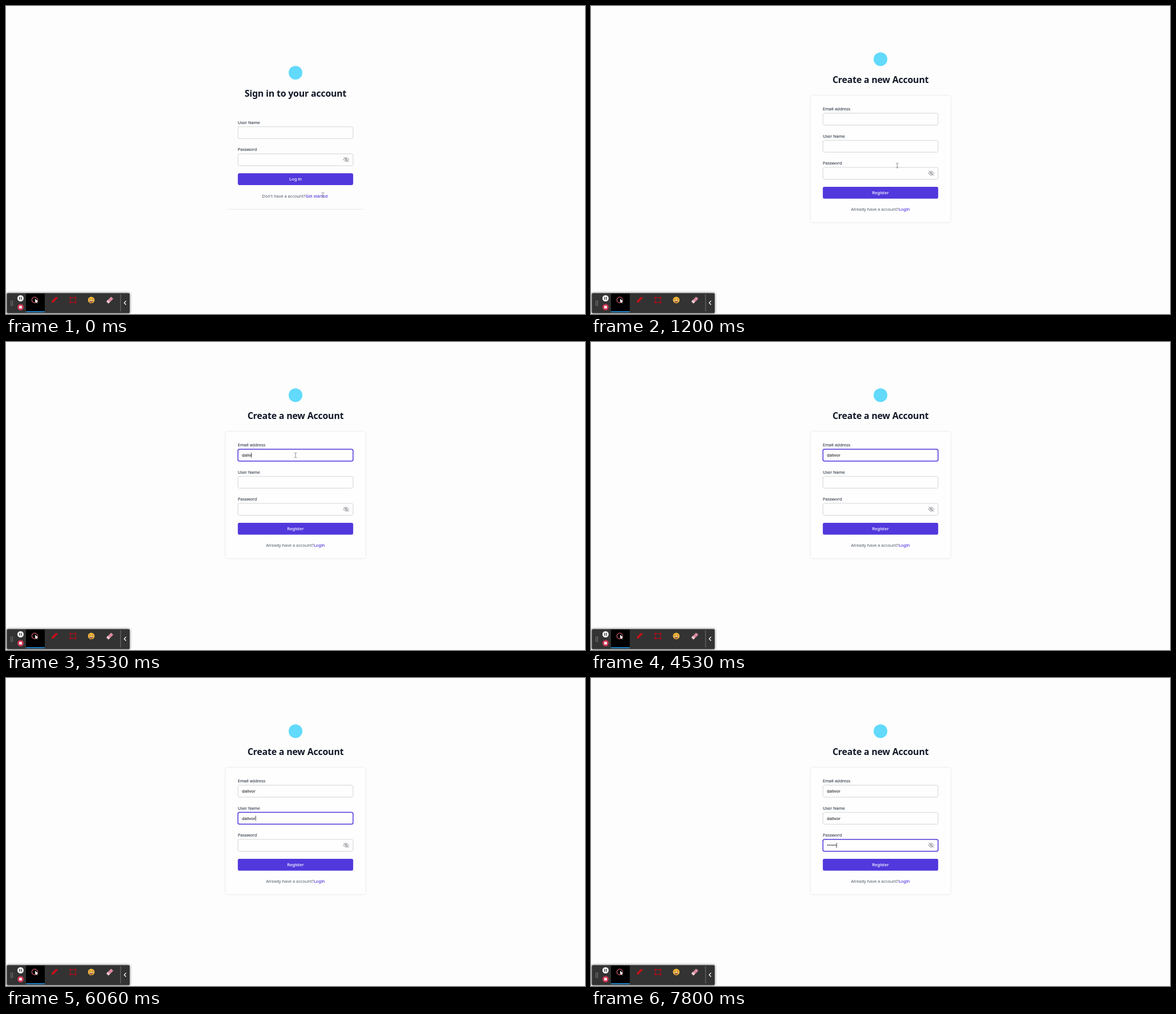
These frames come from a looping animation (1016 px wide and 540 px high, 8 s). An HTML page:

```html
<!DOCTYPE html>
<html lang="en">
<head>
<meta charset="utf-8">
<title>Account form</title>
<style>
  html, body { margin: 0; width: 100%; height: 100%; overflow: hidden; background: #fdfdfd; }
  svg { display: block; width: 100%; height: 100%; }
  text { font: 400 7.4px 'Noto Sans', 'Open Sans', sans-serif; fill: #4b5563; white-space: pre; }
  .title { font-size: 15.9px; font-weight: 700; letter-spacing: -.18px; fill: #111827; text-anchor: middle; }
  .label { font-weight: 500; fill: #374151; stroke: #374151; stroke-width: .14px; }
  .typed { fill: #18181b; stroke: #18181b; stroke-width: .06px; }
  .link { font-weight: 500; fill: #5138dc; stroke: #5138dc; stroke-width: .14px; }
  .end { text-anchor: end; }
  .action { font-size: 7.6px; font-weight: 500; fill: #fff; stroke: #fff; stroke-width: .14px; text-anchor: middle; }
  .tool { font: 500 5.6px Roboto, sans-serif; fill: #fff; stroke: #fff; stroke-width: .1px; text-anchor: middle; }
  .card { fill: #fefefe; filter: drop-shadow(0 .6px .9px rgba(0,0,0,.17)); }
  .field { fill: #fefefe; filter: drop-shadow(0 .4px .4px rgba(0,0,0,.07)); }
  .lift { fill: #fff; filter: drop-shadow(0 5px 4px rgba(0,0,0,.16)); }
  .bar { fill: #333; filter: drop-shadow(0 0 2px rgba(0,0,0,.65)); }
</style>
</head>
<body>
<svg id="stage" viewBox="0 0 1016 540" preserveAspectRatio="none">
  <rect width="1016" height="540" fill="#fdfdfd"/>
  <g id="signin"></g>
  <g id="register"></g>

  <g id="toolbar">
    <rect class="bar" x="1.5" y="503.5" width="215.5" height="35" rx="1.5"/>
    <g id="grip" fill="#aaa"></g>
    <circle cx="25.5" cy="512.5" r="5.5" fill="#f4f4f4"/>
    <path d="M23.9 510v5M27.1 510v5" stroke="#333" stroke-width="1.3"/>
    <circle cx="25.5" cy="528" r="5.5" fill="#cb3550"/>
    <rect x="23.2" y="525.7" width="4.6" height="4.6" fill="#fff"/>
    <rect x="35" y="504" width="33" height="32" fill="#000"/>
    <rect x="35" y="535.2" width="33" height="1.6" fill="#2498e8"/>
    <circle cx="50.4" cy="515.4" r="5" fill="none" stroke="#d4606e" stroke-width="1.2"/>
    <path d="M51 513.2l.4 7.2 1.6-1.5 1.1 2.2 1.2-.6-1.1-2.1 2.1-.4z" fill="#fff"/>
    <g transform="translate(84.7 515.6) rotate(45)">
      <path d="M-1.8-6.4h3.6V3.2L0 6.9l-1.8-3.7z" fill="#d8101c"/>
      <path d="M-1.8-4h3.6M0-3.6V3" stroke="#8e0b13" stroke-width=".7"/>
    </g>
    <rect x="112.8" y="511.4" width="9.2" height="8.4" fill="none" stroke="#b00d18" stroke-width="1.2"/>
    <path d="M111.4 510h2.6v2.6h-2.6zM120.8 510h2.6v2.6h-2.6zM111.4 518.6h2.6v2.6h-2.6zM120.8 518.6h2.6v2.6h-2.6z" fill="#b00d18"/>
    <circle cx="149.6" cy="515.5" r="5.8" fill="#f6b93b"/>
    <path d="M146.2 514.2q1.1-1.6 2.2 0M151 514.2q1.1-1.6 2.2 0" fill="none" stroke="#5c3a16" stroke-width=".9"/>
    <path d="M146 516.2h7.2q-.6 3.6-3.6 3.6t-3.6-3.6z" fill="#7b3b1d"/>
    <path d="M146.6 516.4h6v1.1h-6z" fill="#fff"/>
    <g transform="translate(182.2 515.6) rotate(45)">
      <rect x="-2.7" y="-6" width="5.4" height="12" rx="1" fill="#d58a9c"/>
      <rect x="-2.7" y="2.2" width="5.4" height="3.8" rx="1" fill="#f0c9d2"/>
    </g>
    <path d="M201 505.5v30" stroke="#8a8a8a" stroke-width=".8"/>
    <path d="M210.6 517l-3.2 3.4 3.2 3.4" fill="none" stroke="#fff" stroke-width="1.3"/>
  </g>

  <path id="mouse" d="M-2.2-4.2Q-.3-4.2 0-3.2Q.3-4.2 2.2-4.2M0-3.2V3.2M-2.2 4.2Q-.3 4.2 0 3.2Q.3 4.2 2.2 4.2" fill="none" stroke="#777" stroke-width=".9"/>
</svg>
<script>
const NS = 'http://www.w3.org/2000/svg';
const LOOP = 8000;
const ACCENT = '#5138dc';
const $ = id => document.getElementById(id);

function add(parent, tag, attrs, content) {
  const node = document.createElementNS(NS, tag);
  for (const key in attrs) node.setAttribute(key, attrs[key]);
  if (content) node.textContent = content;
  parent.appendChild(node);
  return node;
}

const label = (parent, cls, x, y, content) => add(parent, 'text', { class: cls, x, y }, content);
const show = (node, on) => node.setAttribute('visibility', on ? 'inherit' : 'hidden');

function addHead(parent, y, title) {
  add(parent, 'circle', { cx: 508, cy: y, r: 12, fill: '#61dafb' });
  label(parent, 'title', 508, y + 42.2, title);
}

function addField(parent, y, name) {
  label(parent, 'label', 406.8, y - 5, name);
  const box = add(parent, 'rect', { class: 'field', x: 407, y, width: 202, height: 20.8, rx: 2.8 });
  const text = label(parent, 'typed', 414, y + 13.1, '');
  const caret = add(parent, 'rect', { y: y + 6, width: .8, height: 8.8, fill: '#18181b' });
  show(caret, false);
  const field = { box, text, caret };
  setFocus(field, false);
  return field;
}

function setFocus(field, on) {
  field.box.setAttribute('stroke', on ? ACCENT : '#d3d4d9');
  field.box.setAttribute('stroke-width', on ? 1.5 : .9);
}

function addEye(parent, y) {
  add(parent, 'path', {
    transform: `translate(597 ${y})`, fill: 'none', stroke: '#84878e',
    'stroke-width': .9, 'stroke-linecap': 'round',
    d: 'M-4.8 0Q-2.6-3.5 0-3.5T4.8 0Q2.6 3.5 0 3.5T-4.8 0M-1.5 0a1.5 1.5 0 1 0 3 0a1.5 1.5 0 1 0-3 0M-4.2-4.2L4.2 4.2'
  });
}

function addButton(parent, y, name) {
  const group = add(parent, 'g', {});
  const size = { x: 406.8, y, width: 202.4, height: 20.7, rx: 2.8 };
  const shadow = add(group, 'rect', { class: 'lift', opacity: 0, ...size });
  const face = add(group, 'rect', { fill: ACCENT, ...size });
  label(group, 'action', 508, y + 13.1, name);
  return { group, shadow, face, mid: y + 10.35 };
}

// Sign-in page
const signin = $('signin');
addHead(signin, 117, 'Sign in to your account');
add(signin, 'path', { d: 'M388 356.3H628', stroke: '#e9e9eb', 'stroke-width': 1 });
addField(signin, 211.7, 'User Name');
addField(signin, 259.2, 'Password');
addEye(signin, 269.2);
addButton(signin, 293.2, 'Log in');
label(signin, 'end', 525.3, 335.6, "Don't have a account?");
label(signin, 'link', 525.5, 335.6, 'Get started');

// Registration page
const register = $('register');
addHead(register, 93.2, 'Create a new Account');
add(register, 'rect', { class: 'card', x: 385.3, y: 157, width: 245.5, height: 222.3, rx: 4 });
const NAME = 'dalivor';
const fields = [
  { name: 'Email address', y: 188, value: NAME, from: 1730, to: 4660,
    keys: [2800, 3000, 3200, 3330, 3530, 3660, 3860], off: [[2200, 2800], [4530, 4660]] },
  { name: 'User Name', y: 235.5, value: NAME, from: 4660, to: 6530,
    keys: [5000, 5200, 5330, 5530, 5660, 5800, 6060], off: [] },
  { name: 'Password', y: 283, value: '••••••', from: 6530, to: LOOP,
    keys: [7000, 7130, 7330, 7530, 7660, 7800], off: [] }
].map(spec => ({ ...spec, ...addField(register, spec.y, spec.name) }));
addEye(register, 293.2);
const button = addButton(register, 317, 'Register');
label(register, 'end', 539.8, 359.3, 'Already have a account?');
label(register, 'link', 540, 359.3, 'Login');

for (let i = 0; i < 8; i++)
  add($('grip'), 'circle', { cx: 8.8 + i % 2 * 2.8, cy: 517.4 + (i >> 1) * 2.5, r: .75 });

const clamp = v => Math.max(0, Math.min(1, v));
const smooth = v => v * v * (3 - 2 * v);
const mix = (a, b, p) => a + (b - a) * p;

function drawField(f, t) {
  const focused = t >= f.from && t < f.to;
  const count = f.keys.filter(k => t >= k).length;
  f.text.textContent = f.value.slice(0, count);
  setFocus(f, focused);
  f.caret.setAttribute('x', 413.9 + (count ? f.text.getComputedTextLength() : 0));
  show(f.caret, focused && !f.off.some(([a, b]) => t >= a && t < b));
}

function drawButton(hover) {
  const scale = 1 + .05 * hover;
  const { group, shadow, face, mid } = button;
  group.setAttribute('transform',
    `translate(508 ${mid - 2.2 * hover}) scale(${scale}) translate(-508 ${-mid})`);
  shadow.setAttribute('opacity', hover);
  face.setAttribute('fill', `rgb(${mix(81, 67, hover)},${mix(56, 44, hover)},${mix(220, 190, hover)})`);
}

function draw(t) {
  const joined = t >= 600;
  show(signin, !joined);
  show(register, joined);
  fields.forEach(f => drawField(f, t));
  drawButton(1 - smooth(clamp((t - 1035) / 150)));
  const p = smooth(clamp((t - 860) / 800));
  $('mouse').setAttribute('transform', `translate(${mix(556, 508, p)} ${mix(331.5, 198.6, p)})`);
  show($('mouse'), t < 3730);
}

const start = performance.now();
function tick() {
  draw((performance.now() - start) % LOOP);
  requestAnimationFrame(tick);
}
tick();
</script>
</body>
</html>
```
